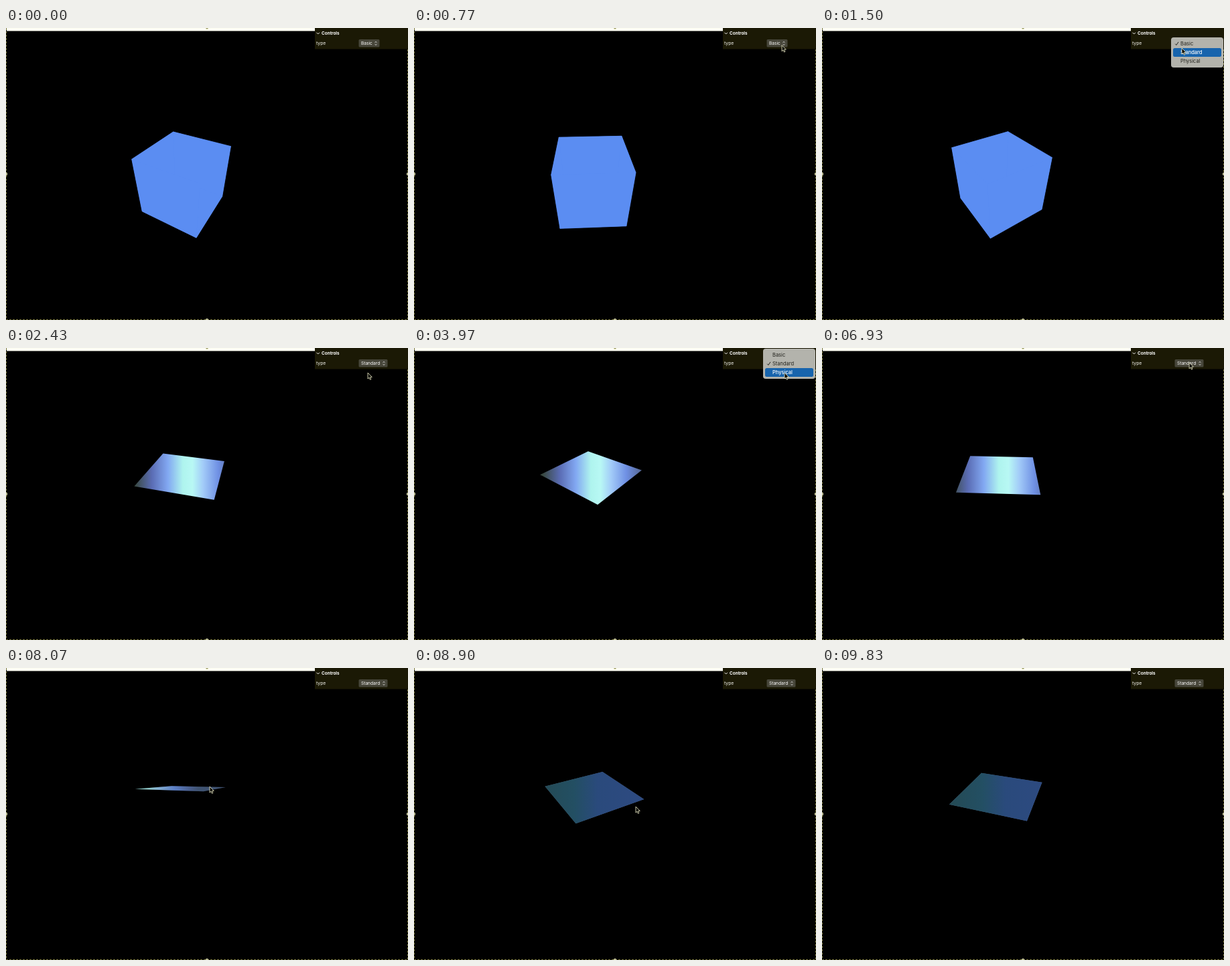
Write an HTML page with a canvas that moves like this. It is 600 px wide and 436 px high and loops after 9.86 s.

```html
<!DOCTYPE html>
<html lang="en">
<head>
<meta charset="utf-8">
<title>Cube materials</title>
<style>
html, body { margin: 0; width: 100%; height: 100%; overflow: hidden; background: #000; }
canvas { display: block; }
</style>
</head>
<body>
<canvas id="stage" width="600" height="436"></canvas>
<script>
const ctx = document.getElementById('stage').getContext('2d');
const LOOP = 9860, RAD = Math.PI / 180;
const FONT = 'Inter, Roboto, sans-serif';
const TYPES = ['Basic', 'Standard', 'Physical'];
const ROW = 13;

// Camera looking at the cube centre
const CX = 265.5, CY = 228, FOCAL = 283, DIST = 2.94;

// [time, x, y]
const POINTER = [
  [250, 610, 80], [850, 546, 23], [1150, 538, 24], [1500, 537, 30], [1900, 539, 35],
  [2430, 540, 37], [3150, 549, 24], [3600, 552, 34], [3970, 553, 37], [4500, 554, 36],
  [5300, 555, 23], [5670, 554, 21], [6200, 552, 11], [7000, 548, 22], [7600, 284, 207],
  [8070, 304, 177], [8900, 331, 207], [9450, 460, 445]
];
// [time, yaw, pitch]
const ORBIT = [[7600, 0, 38.3], [8070, 17.2, 13], [8900, 38.5, 38.3]];
// [open, close, checked type, choice]
const MENUS = [[900, 1900, 0, 1], [3250, 4250, 1, 2], [5400, 6300, 2, 1]];

function track(keys, t) {
  if (t <= keys[0][0]) return keys[0].slice(1);
  for (let i = 1; i < keys.length; i++) {
    const [t0, ...a] = keys[i - 1], [t1, ...b] = keys[i];
    if (t > t1) continue;
    const u = (t - t0) / (t1 - t0), e = u * u * (3 - 2 * u);
    return a.map((v, k) => v + (b[k] - v) * e);
  }
  return keys[keys.length - 1].slice(1);
}

function trace(points) {
  ctx.beginPath();
  points.forEach(([x, y]) => ctx.lineTo(x, y));
  ctx.closePath();
}

function box(x, y, w, h, r, color) {
  ctx.fillStyle = color;
  ctx.beginPath();
  ctx.roundRect(x, y, w, h, r);
  ctx.fill();
}

function label(text, x, y, size, color, weight = 400) {
  ctx.font = `${weight} ${size}px ${FONT}`;
  ctx.fillStyle = color;
  ctx.fillText(text, x, y);
}

function line(points, color, width) {
  ctx.strokeStyle = color;
  ctx.lineWidth = width;
  ctx.beginPath();
  points.forEach(([x, y]) => ctx.lineTo(x, y));
  ctx.stroke();
}

function addStops(gradient, stops) {
  stops.forEach(([at, color]) => gradient.addColorStop(at, color));
  return gradient;
}

function project(angle, height, pitch) {
  const x = Math.SQRT1_2 * Math.sin(angle), z = Math.SQRT1_2 * Math.cos(angle);
  const s = Math.sin(pitch), c = Math.cos(pitch);
  const k = FOCAL / (DIST - height * s - z * c);
  return [CX + x * k, CY - (height * c - z * s) * k];
}

function fillStandard(yaw) {
  const peak = 272 - 3.8 * yaw;
  ctx.fillStyle = addStops(ctx.createLinearGradient(peak - 80, 0, peak + 80, 0), [
    [0, '#38483f'], [.16, '#5a6cb4'], [.31, '#82a8f2'], [.45, '#aff4ee'],
    [.54, '#b8f8f4'], [.64, '#a2cbf8'], [.78, '#6f90e4'], [.93, '#53648f'], [1, '#46566e']
  ]);
  ctx.fillRect(0, 0, 600, 436);
  ctx.globalAlpha = Math.min(1, Math.max(0, (yaw - 10) / 28));
  ctx.fillStyle = addStops(ctx.createLinearGradient(190, 0, 330, 0), [
    [0, '#244a54'], [.35, '#234f63'], [.6, '#2a4a7c'], [1, '#2d4a80']
  ]);
  ctx.fillRect(0, 0, 600, 436);
  ctx.globalAlpha = 1;
}

function fillPhysical() {
  ctx.translate(273, 196);
  ctx.scale(1, 1.9);
  ctx.fillStyle = addStops(ctx.createRadialGradient(0, 0, 0, 0, 0, 48), [
    [0, '#fff'], [.14, '#fff'], [.21, '#c4e0ff'], [.29, '#5482d0'],
    [.4, '#28405e'], [.55, '#241d0c'], [.8, '#10130a'], [1, '#000']
  ]);
  ctx.fillRect(-90, -90, 180, 180);
}

function drawCube(t, type) {
  const [yaw, pitchDeg] = track(ORBIT, t);
  const angle = 14.5 * RAD + .75 * t / 1000 + yaw * RAD;
  const ring = height => [0, 1, 2, 3].map(i => project(angle + i * Math.PI / 2, height, pitchDeg * RAD));
  const top = ring(.5), bottom = ring(-.5);
  if (type === 0) {
    ctx.fillStyle = ctx.strokeStyle = '#5b8df2';
    ctx.lineWidth = .5;
    const sides = top.map((p, i) => [p, top[(i + 1) % 4], bottom[(i + 1) % 4], bottom[i]]);
    [top, bottom, ...sides].forEach(face => { trace(face); ctx.fill(); ctx.stroke(); });
    return;
  }
  ctx.save();
  trace(top);
  ctx.clip();
  type === 1 ? fillStandard(yaw) : fillPhysical();
  ctx.restore();
}

function drawFrame() {
  ctx.setLineDash([3, 2]);
  line([[.5, 0], [.5, 435.5], [599.5, 435.5], [599.5, 0]], '#77753a', 1);
  ctx.setLineDash([]);
  box(1, 0, 460, 4.5, 0, '#fffff4');
  [[300, 0], [0, 218], [600, 218], [300, 436]].forEach(([x, y]) => {
    ctx.beginPath();
    ctx.arc(x, y, 2.2, 0, 7);
    ctx.fillStyle = '#d8d8ae';
    ctx.fill();
    line([[x - 1, y], [x + 1, y]], '#55552c', 1);
  });
}

function drawPanel(type) {
  box(461, 0, 139, 31.5, 0, '#1b1905');
  line([[463.5, 6.8], [465.7, 9], [467.9, 6.8]], '#eee', 1);
  label('Controls', 471, 10.2, 6.4, '#fff', 700);
  label('type', 463, 25.2, 6.8, '#f0f0ec');
  const width = [31, 43, 40][type];
  box(526.5, 17, width, 11.5, 1.5, '#47463a');
  label(TYPES[type], 530, 25.3, 6.6, '#fff');
  const x = 526.5 + width - 5.5;
  line([[x - 1.5, 22], [x, 20.2], [x + 1.5, 22]], '#ddd', .8);
  line([[x - 1.5, 23.8], [x, 25.6], [x + 1.5, 23.8]], '#ddd', .8);
}

function drawMenu(checked, pointerY) {
  const y = 14 - checked * ROW;
  const hover = Math.min(2, Math.max(0, Math.floor((pointerY - y - 3) / ROW)));
  box(521, y, 78, 45, 4, '#b3b3ac');
  box(524, y + 3 + hover * ROW, 72, ROW, 2.5, '#1764ad');
  TYPES.forEach((name, i) => {
    const mid = y + 9.3 + i * ROW, color = i === hover ? '#fff' : '#22221c';
    label(name, 535, mid + 2.7, 7.5, color, i === hover ? 500 : 400);
    if (i === checked) line([[527.2, mid + .4], [528.8, mid + 2.2], [532, mid - 2.4]], color, 1);
  });
}

function drawPointer(x, y) {
  trace([[0, 0], [0, 9], [2, 7.2], [3.4, 10.3], [4.9, 9.6], [3.5, 6.6], [6.3, 6.4]]
    .map(([dx, dy]) => [x + dx, y + dy]));
  ctx.fillStyle = '#0a0a06';
  ctx.fill();
  ctx.strokeStyle = '#f2f0cc';
  ctx.lineWidth = .8;
  ctx.stroke();
}

function render(now) {
  const t = now % LOOP;
  const [px, py] = track(POINTER, t);
  const type = MENUS.reduce((current, [, close, , choice]) => t >= close ? choice : current, 0);
  const menu = MENUS.find(([open, close]) => t >= open && t < close);
  ctx.fillStyle = '#000';
  ctx.fillRect(0, 0, 600, 436);
  drawCube(t, type);
  drawFrame();
  drawPanel(type);
  if (menu) drawMenu(menu[2], py);
  drawPointer(px, py);
}

const start = performance.now();
function tick() {
  render(performance.now() - start);
  requestAnimationFrame(tick);
}
tick();
</script>
</body>
</html>
```
